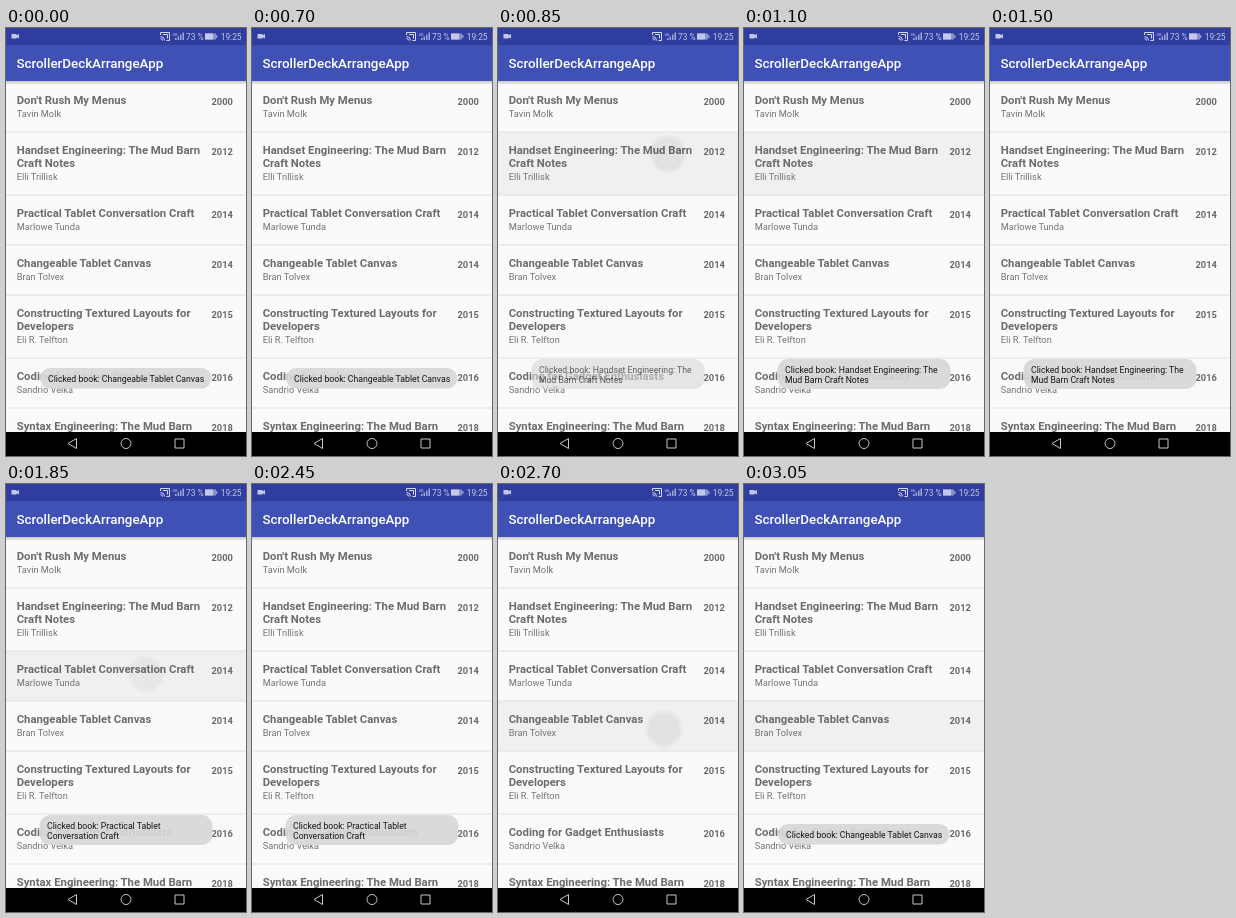
Recreate the animation shown at these times as an HTML page. Size 240 by 428 pixels, loop 3.1 s.

```html
<!DOCTYPE html>
<html lang="en">
<head>
<meta charset="utf-8">
<title>Book list</title>
<style>
html, body { margin: 0; width: 100%; height: 100%; overflow: hidden; background: #fafafa; }
svg { display: block; width: 240px; height: 428px; font-family: Roboto, sans-serif; }
.bar { font-weight: 500; font-size: 13.35px; fill: #fff; }
.status { font-size: 8.4px; fill: #c3c8ea; }
.title { font-weight: 700; font-size: 11.33px; fill: #6c6c6c; }
.author { font-size: 9.25px; fill: #747474; }
.year { font-weight: 700; font-size: 9.35px; fill: #696969; }
.toast text { font-size: 8.7px; fill: #141414; }
.toast rect { fill: #d7d7d7; fill-opacity: .92; }
.press { fill: #f0f0f0; }

/* One 3100 ms loop; holds are hard, fades advance every 50 ms. */
.toast, .press, .dot { opacity: 0; animation: 3100ms step-end infinite; }
#toastA { animation-name: toastA; }
#toastB { animation-name: toastB; }
#toastC { animation-name: toastC; }
#pressA { animation-name: pressA; }
#pressB { animation-name: pressB; }
#pressC { animation-name: pressC; }
#dotA { animation-name: dotA; }
#dotB { animation-name: dotB; }
#dotC { animation-name: dotC; }

@keyframes toastA {
  0% { opacity: 1; }
  24.19% { opacity: 0; }
  87.09% { opacity: 0; animation-timing-function: steps(2); }
  90.32%, 100% { opacity: 1; }
}
@keyframes toastB {
  0% { opacity: 0; }
  24.19% { opacity: 0; animation-timing-function: steps(3); }
  29.03% { opacity: 1; }
  54.83%, 100% { opacity: 0; }
}
@keyframes toastC {
  0% { opacity: 0; }
  54.83% { opacity: 0; animation-timing-function: steps(3); }
  59.67% { opacity: 1; }
  87.09%, 100% { opacity: 0; }
}
@keyframes pressA {
  0% { opacity: 0; }
  25.8% { opacity: 1; }
  40.32% { opacity: 1; animation-timing-function: steps(5); }
  48.38%, 100% { opacity: 0; }
}
@keyframes pressB {
  0% { opacity: 0; }
  56.45% { opacity: 1; }
  66.12% { opacity: 1; animation-timing-function: steps(5); }
  74.19%, 100% { opacity: 0; }
}
@keyframes pressC {
  0% { opacity: 0; }
  87.09%, 100% { opacity: 1; }
}
@keyframes dotA {
  0% { opacity: 0; }
  24.19% { opacity: .6; }
  27.41% { opacity: 1; animation-timing-function: steps(4); }
  33.87%, 100% { opacity: 0; }
}
@keyframes dotB {
  0% { opacity: 0; }
  56.45% { opacity: 1; }
  58.06% { opacity: 1; animation-timing-function: steps(2); }
  61.29% { opacity: .4; }
  66.12%, 100% { opacity: 0; }
}
@keyframes dotC {
  0% { opacity: 0; }
  87.09% { opacity: 1; }
  90.32% { opacity: .4; }
  98.38%, 100% { opacity: 0; }
}
</style>
</head>
<body>
<svg viewBox="0 0 240 428">
  <defs>
    <linearGradient id="shade" x2="0" y2="1">
      <stop stop-color="#000" stop-opacity=".2"/>
      <stop offset="1" stop-color="#000" stop-opacity="0"/>
    </linearGradient>
    <radialGradient id="touch">
      <stop offset=".75" stop-color="#000" stop-opacity=".055"/>
      <stop offset="1" stop-color="#000" stop-opacity="0"/>
    </radialGradient>
  </defs>
  <rect width="240" height="428" fill="#fafafa"/>

  <rect id="pressA" class="press" y="104" width="240" height="63"/>
  <rect id="pressB" class="press" y="167" width="240" height="50"/>
  <rect id="pressC" class="press" y="217" width="240" height="50"/>
  <g id="rows"></g>
  <g fill="url(#touch)">
    <circle id="dotA" class="dot" cx="170" cy="126" r="20"/>
    <circle id="dotB" class="dot" cx="140" cy="190" r="20"/>
    <circle id="dotC" class="dot" cx="166" cy="245" r="20"/>
  </g>

  <rect y="53" width="240" height="4" fill="url(#shade)"/>
  <rect width="240" height="53" fill="#3f51b5"/>
  <rect width="240" height="17" fill="#303f9f"/>
  <text class="bar" x="10.5" y="40">ScrollerDeckArrangeApp</text>

  <g class="status">
    <path d="M5.500 6h5v1.200L13 6v4.500l-2.500-1.200v1.200h-5z"/>
    <path d="M154.500 7V4.500h9v8h-3M154.500 8.500q4 0 4 4M154.500 10.500q2 0 2 2M157 6.500h4.500v4" fill="none" stroke="#d5d9f2"/>
    <text x="166.500" y="7.500" style="font-size:4px">4G</text>
    <path opacity=".75" d="M169 12v-2h1.500v2zM171.500 12V8.500h1.500V12zM174 12V6.500h1.500V12zM176.500 12V4.500h1.500V12z"/>
    <text x="180" y="11.500">73 %</text>
    <path opacity=".6" d="M199 5.500h11v1.500h1.500v3h-1.500v1.500h-11z"/>
    <path d="M199 5.500h8v6h-8z"/>
    <text x="214.700" y="11.500">19:25</text>
  </g>

  <g id="toastA" class="toast">
    <rect x="34" y="340" width="171.500" height="20.500" rx="10.250"/>
    <text x="42" y="353.500">Clicked book: Changeable Tablet Canvas</text>
  </g>
  <g id="toastB" class="toast">
    <rect x="33.500" y="331" width="173" height="30" rx="11"/>
    <text x="41" y="344.500">Clicked book: Handset Engineering: The</text>
    <text x="41" y="355">Mud Barn Craft Notes</text>
  </g>
  <g id="toastC" class="toast">
    <rect x="33.500" y="331" width="173" height="30" rx="11"/>
    <text x="41" y="344.500">Clicked book: Practical Tablet</text>
    <text x="41" y="355">Conversation Craft</text>
  </g>

  <rect y="404" width="240" height="24" fill="#000"/>
  <g fill="none" stroke="#c8c8c8">
    <path d="M62 415.500l8.500-5v10z"/>
    <circle cx="120" cy="415.500" r="5"/>
    <path d="M169 411h9v9h-9z"/>
  </g>
</svg>
<script>
const books = [
  [["Don't Rush My Menus"], "Tavin Molk", 2000],
  [["Handset Engineering: The Mud Barn", "Craft Notes"], "Elli Trillisk", 2012],
  [["Practical Tablet Conversation Craft"], "Marlowe Tunda", 2014],
  [["Changeable Tablet Canvas"], "Bran Tolvex", 2014],
  [["Constructing Textured Layouts for", "Developers"], "Eli R. Telfton", 2015],
  [["Coding for Gadget Enthusiasts"], "Sandrio Velka", 2016],
  [["Syntax Engineering: The Mud Barn"], "", 2018]
];
const lineHeight = 13;
const label = (kind, x, y, words) => `<text class="${kind}" x="${x}" y="${y}">${words}</text>`;

let rowTop = 54, markup = "";
for (const [lines, author, year] of books) {
  const extra = (lines.length - 1) * lineHeight;
  lines.forEach((line, i) => markup += label("title", 10.7, rowTop + 22 + i * lineHeight, line));
  markup += label("author", 10.7, rowTop + 35.4 + extra, author);
  markup += label("year", 205.5, rowTop + 23, year);
  rowTop += 50 + extra;
  markup += `<rect y="${rowTop - .5}" width="240" height="1" fill="#dfdfdf"/>`;
}
document.getElementById("rows").innerHTML = markup;
</script>
</body>
</html>
```
